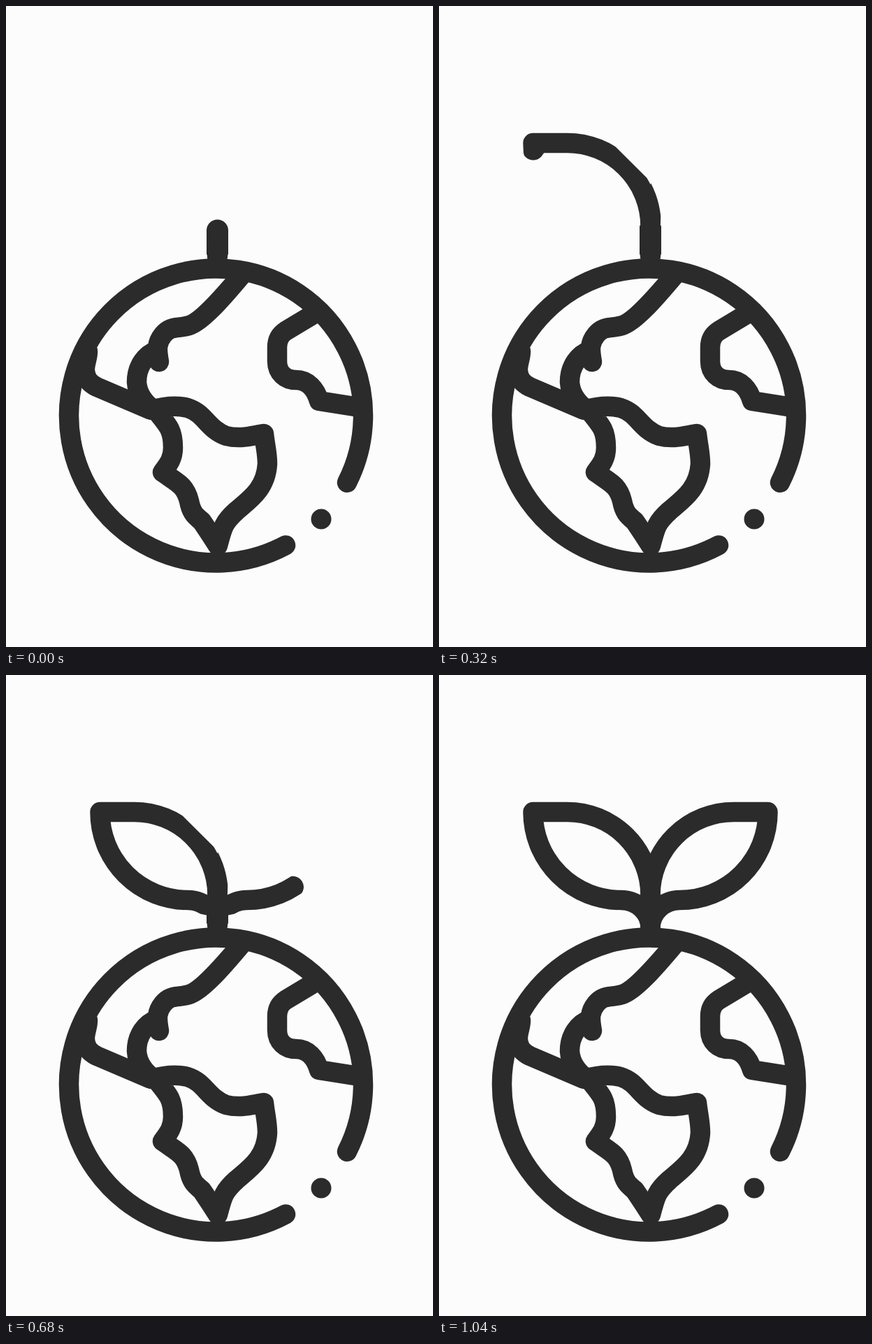
These frames come from a looping animation (611x917 px, 8000 ms). An HTML page:

```html
<!DOCTYPE html>
<html lang="en">
<head>
<meta charset="utf-8">
<title>Sprouting globe</title>
<style>
  html, body { margin: 0; height: 100%; overflow: hidden; background: #fcfcfc; }
  svg { display: block; width: 100%; height: 100%; }
  path { fill: none; stroke: #2b2b2b; stroke-width: 28.5; stroke-linecap: round; stroke-linejoin: round; }
  #brush { stroke: #fff; stroke-width: 31; }
</style>
</head>
<body>
<svg viewBox="0 0 611 917">
  <defs>
    <mask id="reveal" maskUnits="userSpaceOnUse" x="0" y="0" width="611" height="917">
      <path id="brush" d="M302.5 355V315A119 119 0 0 0 288.6 259L239.4 210A119 119 0 0 0 183.5 196H134.5
        A126 126 0 0 0 260.5 322L302.5 331L344.5 322A126 126 0 0 0 431.5 287L459.5 247.5
        A126 126 0 0 0 470.5 196H421.5A119 119 0 0 0 302.5 315"/>
    </mask>
    <path id="leaf" d="M302.5 366V315A119 119 0 0 0 183.5 196H134.5A126 126 0 0 0 260.5 322A42 40 0 0 1 302.5 362"/>
  </defs>

  <g id="sprout">
    <use href="#leaf"/>
    <use href="#leaf" transform="matrix(-1 0 0 1 605 0)"/>
  </g>

  <!-- globe -->
  <path d="M488 681.7A210.5 210.5 0 1 0 400 771.5"/>
  <circle cx="451" cy="734" r="14.5" fill="#2b2b2b"/>
  <!-- North America -->
  <path d="M337 385C306 422 279 452 262 457S236 457 225 470C215 482 216 492 219 509"/>
  <path d="M216 493C200 498 187 515 187 538C188 556 200 570 212 578"/>
  <path d="M117 494C117 505 112 512 113 522C114 534 120 540 130 545L205 577"/>
  <!-- South America -->
  <path d="M208 578C225 573 245 571 260 575C285 583 288 605 315 615C335 620 350 615 369 612
    C371 630 374 640 374 655C372 690 350 705 330 722C312 738 310 745 303 772
    C294 758 287 747 280 737C270 729 265 724 262 708C256 685 245 682 224 667
    C232 656 239 648 239 632C239 608 234 602 214 578"/>
  <!-- Africa -->
  <path d="M440 441L400 465Q388 473 388 488V508C388 525 400 535 415 535C432 535 443 548 448 565L505 574"/>
</svg>
<script>
  const LOOP = 8000, STEP = 40, DONE = 1040;
  // [time in ms, length drawn]
  const keys = [[120, 85], [320, 284], [440, 400], [680, 628], [880, 821], [DONE, 990]];
  const sprout = document.getElementById('sprout');
  const brush = document.getElementById('brush');

  function drawnLength(t) {
    if (t < keys[0][0]) return 34;
    const i = keys.findIndex(([time]) => t < time);
    const [t0, a] = keys[i - 1], [t1, b] = keys[i];
    return a + (b - a) * (t - t0) / (t1 - t0);
  }

  function render(now) {
    const t = Math.floor(now % LOOP / STEP) * STEP;
    if (t < DONE) {
      brush.setAttribute('stroke-dasharray', `${drawnLength(t)} 2000`);
      sprout.setAttribute('mask', 'url(#reveal)');
    } else {
      sprout.removeAttribute('mask');
    }
  }

  function tick(now) {
    render(now);
    requestAnimationFrame(tick);
  }
  render(0);
  requestAnimationFrame(tick);
</script>
</body>
</html>
```
